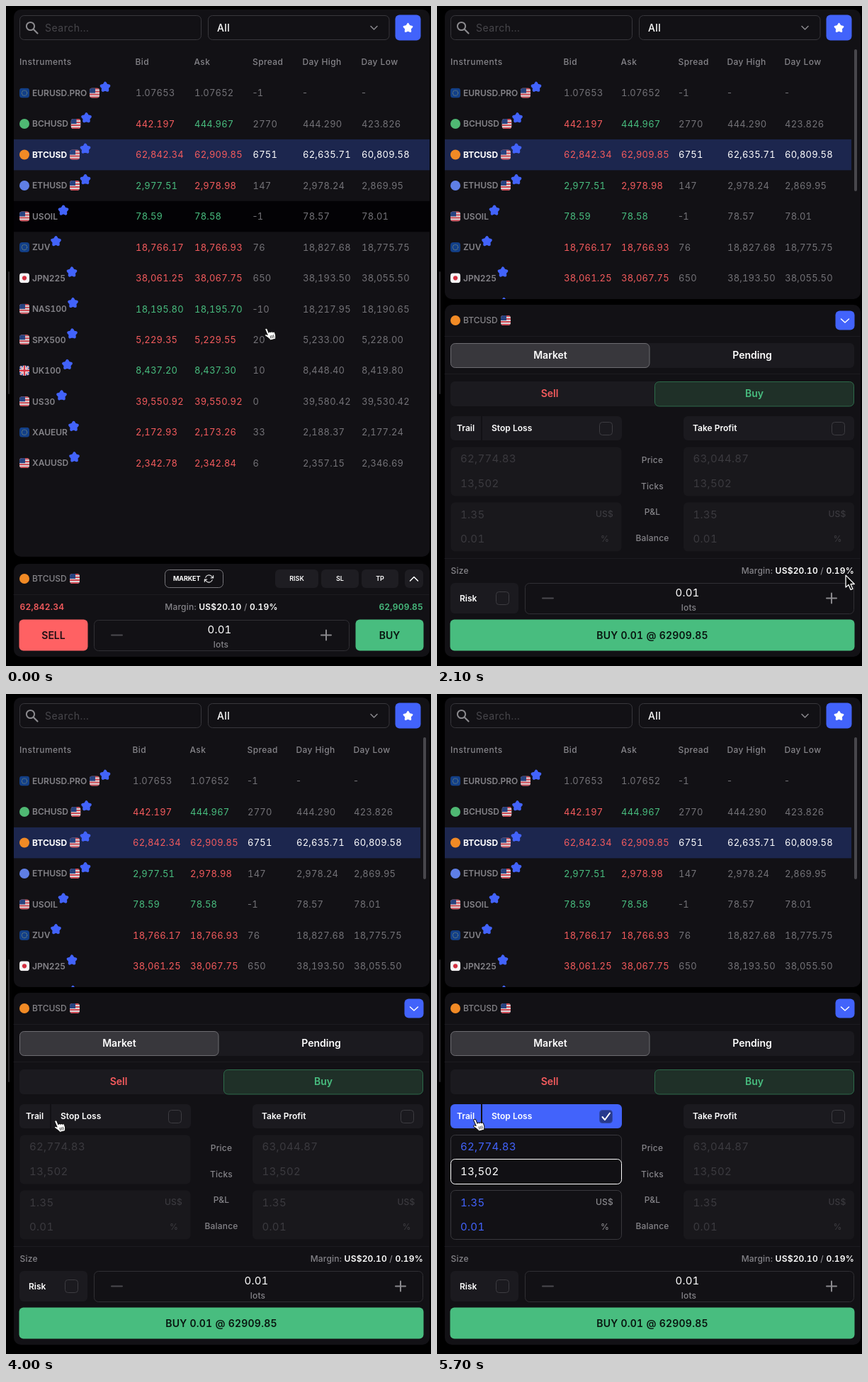
Write an HTML page that moves like this. It is 600 by 930 pixels and loops after 5.8 s.

```html
<!DOCTYPE html>
<html lang="en">
<head>
<meta charset="utf-8">
<title>Trading panel</title>
<style>
  html, body { margin: 0; width: 100%; height: 100%; overflow: hidden; background: #000; }
  svg { display: block; width: 600px; height: 930px; }
  text { font-family: Inter, "Liberation Sans", sans-serif; font-variant-numeric: tabular-nums; white-space: pre; }
  .sign { font-variant-numeric: normal; }
</style>
</head>
<body>
<svg id="stage" viewBox="0 0 600 930"></svg>
<script>
const LOOP = 5800, STEP = 100;
const OPEN_AT = 2000, HOVER_AT = 1000, TRAIL_AT = 4400, TRAIL_FADE = 300;
const ROW_TOP = 101, ROW_H = 43.46, PANEL_W = 587;
const C = {
  panel: '#121115', box: '#1b1a1f', field: '#19181c', line: '#1c1b20', edge: '#302f34',
  blue: '#4263fb', red: '#f45b5d', green: '#48bd7f', gray: '#737277', label: '#858489',
  dim: '#3b3a3f', white: '#ffffff'
};

// name | icon | extra flag | star x | bid and ask tones | values
const rows = `EURUSD.PRO|eu|us|140|nn|1.07653|1.07652|-1|-|-
BCHUSD|#4fb873|us|113.5|rg|442.197|444.967|2770|444.290|423.826
BTCUSD|#f18a25|us|112|rr|62,842.34|62,909.85|6751|62,635.71|60,809.58
ETHUSD|#5f7fe6|us|112|gr|2,977.51|2,978.98|147|2,978.24|2,869.95
USOIL|us||81|gg|78.59|78.58|-1|78.57|78.01
ZUV|eu||70.5|rr|18,766.17|18,766.93|76|18,827.68|18,775.75
JPN225|jp||93|rr|38,061.25|38,067.75|650|38,193.50|38,055.50
NAS100|us||94.5|gg|18,195.80|18,195.70|-10|18,217.95|18,190.65
SPX500|us||93.5|rr|5,229.35|5,229.55|20|5,233.00|5,228.00
UK100|uk||86.5|gg|8,437.20|8,437.30|10|8,448.40|8,419.80
US30|us||78.5|rr|39,550.92|39,550.92|0|39,580.42|39,530.42
XAUEUR|eu||95.5|rr|2,172.93|2,173.26|33|2,188.37|2,177.24
XAUUSD|us||96.5|rr|2,342.78|2,342.84|6|2,357.15|2,346.69`
  .split('\n').map(line => {
    const [name, icon, flag, star, tones, ...values] = line.split('|');
    return { name, icon, flag, star: +star, tones, values, selected: name === 'BTCUSD' };
  });
const headers = ['Bid', 'Ask', 'Spread', 'Day High', 'Day Low'];
const wideCols = [183, 266, 348.5, 419, 502];
const narrowCols = [179, 260, 341, 410, 491];

// Pointer tip: time, x, y
const pointerPath = [
  [-100, 300, 296], [0, 367, 454.5], [500, 582, 809], [1000, 582, 809], [1100, 582, 806],
  [2000, 582, 806], [2300, 563, 791], [2500, 563, 791], [3200, 101, 604],
  [3700, 101, 604], [4200, 53, 599.5], [LOOP, 53, 599.5]
];

const clamp = v => Math.max(0, Math.min(1, v));
const smooth = v => v * v * (3 - 2 * v);
const mix = (a, b, k) => {
  const part = (hex, i) => parseInt(hex.slice(1 + 2 * i, 3 + 2 * i), 16);
  return `rgb(${[0, 1, 2].map(i => Math.round(part(a, i) + (part(b, i) - part(a, i)) * k))})`;
};

const rect = (x, y, w, h, fill, r = 0, stroke = 'none') =>
  `<rect x="${x}" y="${y}" width="${w}" height="${h}" rx="${r}" fill="${fill}" stroke="${stroke}"/>`;
const path = (d, stroke, width = 1.5, extra = '') =>
  `<path d="${d}" fill="none" stroke="${stroke}" stroke-width="${width}" stroke-linecap="round" stroke-linejoin="round" ${extra}/>`;
const text = (x, cy, s, size, weight, fill, anchor = 'start', spacing = 0.2) =>
  `<text x="${x}" y="${cy + size * 0.36}" font-size="${size}" font-weight="${weight}" fill="${fill}" text-anchor="${anchor}" letter-spacing="${spacing}">${s}</text>`;
const mid = (x, cy, s, size, weight, fill, spacing = 0) => text(x, cy, s, size, weight, fill, 'middle', spacing);
const button = (x, y, w, h, fill, label, size, ink = C.white, spacing = 0) =>
  rect(x, y, w, h, fill, 6) + mid(x + w / 2, y + h / 2, label, size, 600, ink, spacing);

function star(x, y, r, fill, round) {
  const pts = Array.from({ length: 10 }, (_, i) => {
    const a = i * Math.PI / 5 - Math.PI / 2, d = i % 2 ? r * 0.56 : r;
    return `${(x + d * Math.cos(a)).toFixed(2)},${(y + d * Math.sin(a)).toFixed(2)}`;
  });
  return `<polygon points="${pts.join(' ')}" fill="${fill}" stroke="${fill}" stroke-width="${round}" stroke-linejoin="round"/>`;
}

const flags = {
  us: rect(0, 0, 14, 14, '#dcd5d8') +
    [0, 4, 8, 12].map(y => rect(0, y, 14, 2, '#cc4853')).join('') + rect(0, 0, 8, 7, '#27427f'),
  eu: rect(0, 0, 14, 14, '#123f88') +
    '<circle cx="7" cy="7" r="3.7" fill="none" stroke="#7f8f78" stroke-width="1.1" stroke-dasharray="1 .94"/>',
  jp: rect(0, 0, 14, 14, '#f6f4f5') + '<circle cx="7" cy="7" r="3.1" fill="#d22f40"/>',
  uk: rect(0, 0, 14, 14, '#29479a') + path('M0 0L14 14M14 0L0 14', '#eee', 2.6) +
    path('M0 0L14 14M14 0L0 14', '#d5384a', 0.9) + path('M7 0V14M0 7H14', '#eee', 4.4) +
    path('M7 0V14M0 7H14', '#d5384a', 2.4)
};
const icon = (x, y, kind) => flags[kind]
  ? `<g transform="translate(${x - 7} ${y - 7})"><g clip-path="url(#tile)">${flags[kind]}</g></g>`
  : `<circle cx="${x}" cy="${y}" r="7" fill="${kind}"/>`;

const defs = height => `<defs>
  <clipPath id="tile"><rect width="14" height="14" rx="4"/></clipPath>
  <clipPath id="list"><rect x="11" y="5" width="${PANEL_W}" height="${height}" rx="10"/></clipPath></defs>`;

function searchBar() {
  return rect(19.5, 13.5, 256, 34, 'none', 6, '#38373c') +
    '<circle cx="34.5" cy="28.5" r="5.6" fill="none" stroke="#8b8a8e" stroke-width="2"/>' +
    path('M39 33L44.5 38.5', '#8b8a8e', 2.2) +
    text(55, 30.5, 'Search...', 14, 400, '#47464b', 'start', 0.5) +
    rect(285.5, 13.5, 255.5, 34, 'none', 6, '#38373c') +
    text(298, 30.5, 'All', 14, 500, C.white, 'start', 0.4) +
    path('M515 28.5L519.5 33L524 28.5', '#8b8a8e') +
    rect(549.5, 12.5, 36, 36, C.blue, 6) + star(567.5, 31, 6, C.white, 2.4);
}

function table(cols, width, hovered) {
  const tones = { r: C.red, g: C.green, n: C.gray };
  let out = text(19, 79, 'Instruments', 12, 500, C.label, 'start', 0.5) +
    headers.map((h, i) => text(cols[i] - 0.5, 79, h, 12, 500, C.label, 'start', 0.4)).join('');
  rows.forEach((row, i) => {
    const top = ROW_TOP + i * ROW_H, cy = top + 21.6;
    if (row.selected) out += rect(11, top, width, ROW_H, '#1c264e');
    else if (i === hovered) out += rect(11, top, width, ROW_H, '#030205');
    out += icon(26, cy, row.icon) +
      text(37, cy, row.name, 12, row.selected ? 700 : 600, row.selected ? C.white : '#848388', 'start', 0);
    if (row.flag) out += icon(row.star - 15, cy, row.flag);
    out += star(row.star, cy - 8.3, 5.6, C.blue, 4);
    row.values.forEach((v, j) => {
      const plain = row.selected ? C.white : C.gray;
      const label = v.replace('-', '<tspan class="sign">-</tspan>');
      out += text(cols[j], cy, label, 13, 400, j < 2 ? tones[row.tones[j]] : plain);
    });
  });
  return out;
}

const instrument = y => icon(26, y, '#f18a25') + text(37, y, 'BTCUSD', 12, 500, C.label, 'start', 0) + icon(97, y, 'us');
const margin = (x, y, anchor) => text(x, y,
  `Margin: <tspan fill="#fff" font-weight="600">US$20.10</tspan> / <tspan fill="#fff" font-weight="600">0.19%</tspan>`,
  12, 500, C.label, anchor, 0.2);
const lots = (y, w, plusX) => rect(124.5, y + 0.5, w, 43, 'none', 6, C.edge) +
  path(`M149 ${y + 21.5}H164`, '#4b4a4f', 2) +
  path(`M${plusX - 7} ${y + 21.5}H${plusX + 7}M${plusX} ${y + 14.5}V${y + 28.5}`, '#8a898d', 2) +
  mid(124 + w / 2 - 2.5, y + 13.5, '0.01', 15, 400, C.white, 0.2) +
  mid(124 + w / 2 - 0.5, y + 34.5, 'lots', 12, 500, C.label, 0.2);
const checkbox = (x, y, fill = 'none', edge = '#3d3c41') => rect(x, y, 18, 18, fill, 4, edge);
const refresh = (x, y) => `<g transform="translate(${x} ${y}) scale(.56) translate(-12 -12)">` +
  path('M23 4V10H17M1 20V14H7M3.5 9A9 9 0 0 1 18.4 5.6L23 10M1 14L5.6 18.4A9 9 0 0 0 20.5 15', '#e4e4e5', 2) + '</g>';

function compactTicket(t) {
  return rect(11, 786, PANEL_W, 131, C.panel, 10) + instrument(807) +
    rect(224.5, 794.5, 82, 25, 'none', 6, '#77767b') +
    text(236, 807, 'MARKET', 9, 700, C.white, 'start', -0.1) + refresh(286.5, 807) +
    [['RISK', 380, 61], ['SL', 445, 53], ['TP', 502, 52]]
      .map(([s, x, w]) => button(x, 794, w, 26, '#1e1d22', s, 9)).join('') +
    rect(563, 794, 26, 26, t >= HOVER_AT ? '#3d3c41' : '#1e1d22', 6) +
    path('M570.5 810L576 804.5L581.5 810', C.white) +
    path('M11 829.5H597', C.line, 1) +
    text(19.5, 847, '62,842.34', 12, 600, C.red) +
    margin(304, 847, 'middle') +
    text(589, 847, '62,909.85', 12, 600, C.green, 'end') +
    button(18.5, 864.5, 97, 44, '#ff6163', 'SELL', 14, '#1b0e12') +
    lots(865, 360, 452) +
    button(493.5, 864.5, 96, 44, C.green, 'BUY', 14, '#08150f');
}

function protection(x, price, k) {
  const tone = (a, b) => mix(a, b, k);
  const value = tone(C.dim, C.blue), unit = tone(C.dim, '#89888c');
  const edge = k > 0 ? '#39383d' : 'none', fill = k > 0 ? C.panel : C.field;
  const entry = (y, s, color) => text(x + 14, y, s, 15, 400, color, 'start', 0.3);
  return rect(x + 0.5, 621.5, 241, 69, fill, 6, edge) + rect(x + 0.5, 699.5, 241, 69, fill, 6, edge) +
    (k > 0 ? rect(x + 0.5, 655.5, 241, 35, '#111014', 6, tone('#8a898d', C.white)) : '') +
    entry(638, price, value) + entry(673, '13,502', tone(C.dim, C.white)) +
    entry(716.5, '1.35', value) + entry(751, '0.01', value) +
    text(x + 230, 716, 'US$', 12, 500, unit, 'end') + mid(x + 218, 751, '%', 12, 500, unit);
}

function fullTicket(t) {
  const p = clamp((t - TRAIL_AT) / TRAIL_FADE), k = 1 - (1 - p) ** 2.5;
  let out = rect(11, 421, PANEL_W, 496, C.panel, 10) + instrument(443) +
    rect(562.5, 429.5, 27, 27, C.blue, 6) + path('M570.5 441L576 446L581.5 441', C.white) +
    [465.5, 518.5, 778.5].map(y => path(`M11 ${y}H597`, C.line, 1)).join('') +
    rect(19, 475, 570, 35, C.box, 6) + rect(19.5, 475.5, 280.5, 34, '#38373c', 6, '#6d6c71') +
    mid(160, 492, 'Market', 14, 600, C.white) + mid(445, 492, 'Pending', 14, 600, C.white) +
    rect(19, 529, 570, 35, C.box, 6) + rect(307.5, 529.5, 281, 34.5, '#1f3028', 6, '#2c6b4a') +
    mid(159, 546, 'Sell', 14, 600, C.red) + mid(448, 546, 'Buy', 14, 600, C.green) +
    rect(19, 578, 242, 34, mix(C.box, C.blue, k), 6) + rect(62, 578, 2, 34, C.panel) +
    text(28, 595, 'Trail', 12, 600, C.white, 'start', 0) +
    text(77, 595, 'Stop Loss', 12, 600, C.white, 'start', 0) +
    checkbox(229.5, 586.5, mix(C.box, '#27398c', k), mix('#3d3c41', '#3148ac', k));
  if (p > 0) out += path('M233.5 596L237 600L244 590.5', C.white, 2,
    `pathLength="1" stroke-dasharray="${p} 2"`);
  return out + rect(348, 578, 241, 34, C.box, 6) +
    text(361, 595, 'Take Profit', 12, 600, C.white, 'start', 0) + checkbox(557.5, 586.5) +
    protection(19, '62,774.83', k) + protection(347.5, '63,044.87', 0) +
    ['Price', 'Ticks', 'P&amp;L', 'Balance'].map((s, i) => mid(304, 639.5 + i * 36.8, s, 12, 500, C.label, 0.2)).join('') +
    text(19.5, 795.5, 'Size', 12, 500, C.label) + margin(589, 795.5, 'end') +
    rect(19, 813, 96, 43, C.box, 6) + text(32, 834.5, 'Risk', 12, 600, C.white, 'start', 0) +
    checkbox(83.5, 825.5) + lots(813, 464, 557) +
    button(18.5, 864.5, 571, 44, C.green, 'BUY 0.01 @ 62909.85', 14, '#08150f', 0.25);
}

function pointerAt(t) {
  const i = Math.max(1, pointerPath.findIndex(key => key[0] >= t));
  const [t0, x0, y0] = pointerPath[i - 1], [t1, x1, y1] = pointerPath[i];
  const k = smooth(clamp((t - t0) / (t1 - t0)));
  return [x0 + (x1 - x0) * k, y0 + (y1 - y0) * k];
}

const shape = (d, fill, stroke, w = 1) =>
  `<path d="${d}" fill="${fill}" stroke="${stroke}" stroke-width="${w}" stroke-linejoin="round"/>`;
const beamPath = 'M-4 -8Q0 -8 0 -5Q0 -8 4 -8M0 -5V5M-4 8Q0 8 0 5Q0 8 4 8M-2 2H2';
const pointers = {
  hand: '<g transform="rotate(-14) translate(-4.5 -1)">' +
    shape('M3 2.2C3 .4 6 .4 6.2 2.2L7 7.5c.5-1.4 2.6-1.2 2.9.2.8-1 2.6-.6 2.8.7.9-.8 2.5-.2 2.6 1.2l.2 3.6c0 2-1 3.2-1.2 5.2H6.5C5.8 16 3.4 13.6 1.2 11.2 0 9.6 1.8 8.3 3.2 9.3l1.2 1z', '#fff', '#111') +
    path('M8 12.5V16M10.2 12.5V16M12.4 12.5V16', '#222', 0.8) + '</g>',
  beam: path(beamPath, C.white, 3) + path(beamPath, '#000', 1),
  arrow: shape('M0 0V17L4 13.4L7 20.4L9.8 19.2L6.9 12.4H12.2Z', '#000', '#fff', 1.3)
};

function pointer(t) {
  const [x, y] = pointerAt(t);
  const overTrail = t >= OPEN_AT && x < 261 && y < 613;
  const kind = t < 1100 || overTrail ? 'hand' : t >= 2300 && t <= 2500 ? 'beam' : 'arrow';
  return `<g transform="translate(${x} ${y})">${pointers[kind]}</g>`;
}

function scene(t) {
  const open = t >= OPEN_AT, height = open ? 408 : 771;
  const hovered = open ? -1 : Math.floor((pointerAt(t - STEP)[1] - ROW_TOP) / ROW_H);
  return defs(height) + rect(0, 0, 600, 930, '#000') + rect(3, 374, 2, 173, '#29282c', 1) +
    rect(11, 5, PANEL_W, height, C.panel, 10) + searchBar() +
    `<g clip-path="url(#list)">${table(open ? narrowCols : wideCols, open ? 574 : PANEL_W, hovered)}</g>` +
    (open ? rect(589, 61, 4, 200, '#48474c', 2) + fullTicket(t) : compactTicket(t)) + pointer(t);
}

const stage = document.getElementById('stage');
const start = performance.now();
let shown = -1;
function tick() {
  const t = Math.floor((performance.now() - start) % LOOP / STEP) * STEP;
  if (t !== shown) stage.innerHTML = scene(shown = t);
  requestAnimationFrame(tick);
}
tick();
</script>
</body>
</html>
```
